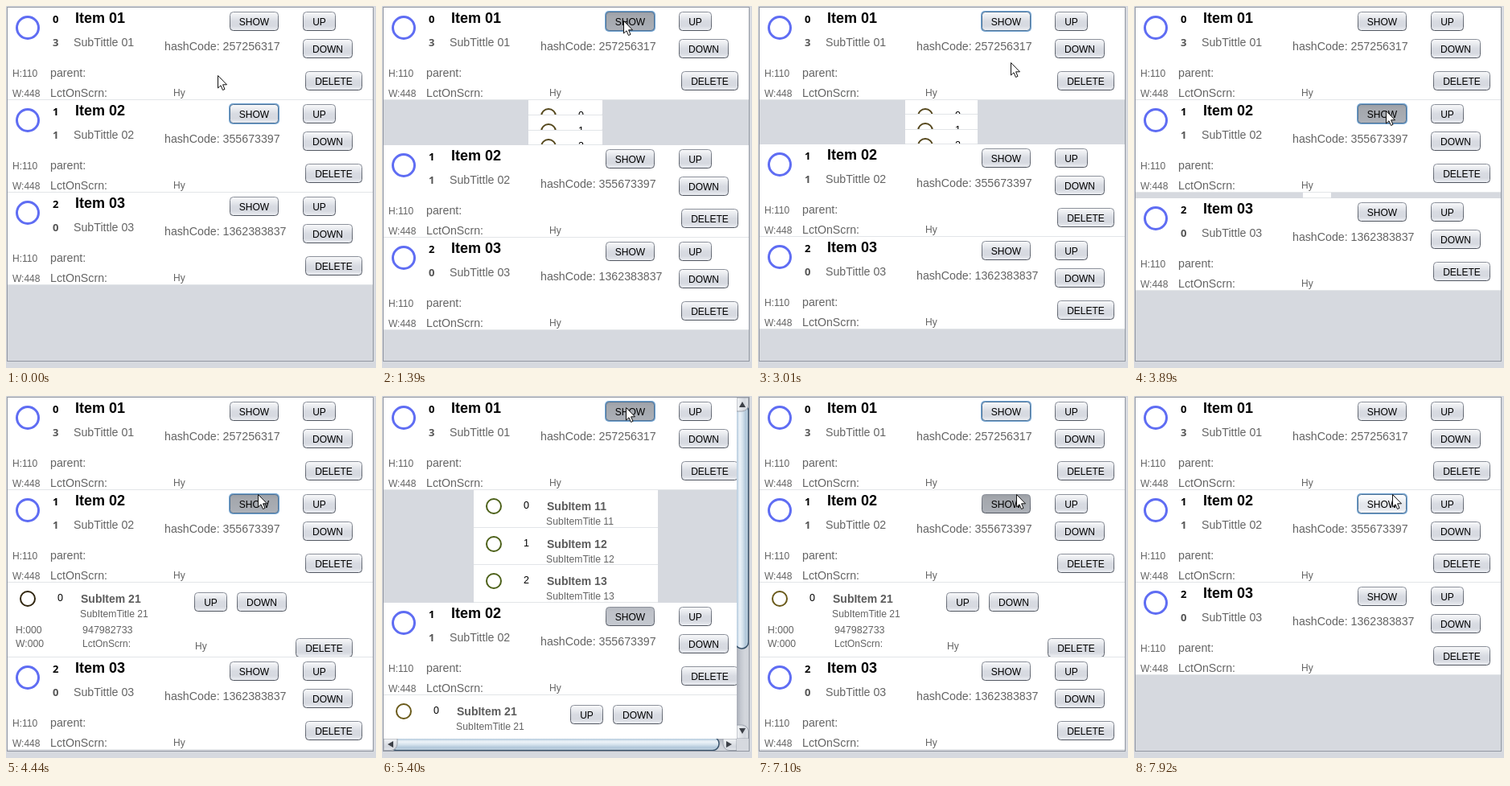
Write an HTML page with a canvas that moves like this. It is 460 px wide and 450 px high and loops after 8.32 s.

```html
<!DOCTYPE html>
<html lang="en">
<head>
<meta charset="utf-8">
<title>Expandable list</title>
<style>
  html, body { margin: 0; width: 100%; height: 100%; overflow: hidden; background: #d6d9df; }
  canvas { display: block; width: 460px; height: 450px; }
</style>
</head>
<body>
<canvas id="stage" width="460" height="450"></canvas>
<script>
const ctx = document.getElementById('stage').getContext('2d');
const LOOP = 8320, ITEM_H = 115, SUB_H = 93, EXPAND_MS = 400;
const SANS = '"Liberation Sans", Arial, sans-serif';
const GREY = '#646464';

const items = [
  { hash: 257256317, subs: [172581121, 1586601928, 259615392] },
  { hash: 355673397, subs: [947982733] },
  { hash: 1362383837, subs: [] }
];
// [open start, close start] for each item
const toggles = [[[1310, 2690], [5200, 6410]], [[3860, 7480]], []];
// [time, item]
const clicks = [[1260, 0], [2660, 0], [3760, 1], [5160, 0], [6340, 0], [7370, 1]];
// [time, x, y]
const pointer = [
  [0, 263, 86], [540, 263, 86], [1000, 300, 18], [1880, 300, 18], [2130, 300, 50],
  [2370, 300, 50], [2460, 306, 22], [2780, 306, 22], [3010, 314, 70], [3210, 313, 149],
  [3380, 313, 149], [3560, 313, 130], [4370, 313, 130], [4440, 313, 122], [4630, 305, 55],
  [4750, 305, 55], [5050, 303, 18], [5300, 303, 18], [5610, 304, 5], [5679, 304, 5],
  [5680, 299, 27], [6079, 299, 27], [6080, 300, 23], [6780, 300, 23], [7100, 321, 122],
  [LOOP, 321, 122]
];

const clamp = v => Math.max(0, Math.min(1, v));
const mix = (a, b, k) => a + (b - a) * k;

function pointerAt(t) {
  const i = pointer.findIndex(k => k[0] > t);
  const [t0, x0, y0] = pointer[i - 1], [t1, x1, y1] = pointer[i];
  const k = (t - t0) / (t1 - t0);
  return [Math.round(mix(x0, x1, k)), Math.round(mix(y0, y1, k))];
}

function openness(i, t) {
  return toggles[i].reduce((sum, [open, close]) =>
    sum + clamp((t - open) / EXPAND_MS) - clamp((t - close) / EXPAND_MS), 0);
}

function isSelected(i, t) {
  return clicks.filter(([at, item]) => item === i && t >= at + 70).length % 2 === 1;
}

function text(str, x, y, size, color = GREY, weight = '', family = SANS) {
  ctx.font = `${weight} ${size}px ${family}`;
  ctx.fillStyle = color;
  ctx.fillText(str, x, y);
}

function rect(x, y, w, h, color) {
  ctx.fillStyle = color;
  ctx.fillRect(x, y, w, h);
}

function ring(x, y, r, width, color) {
  ctx.beginPath();
  ctx.arc(x, y, r, 0, 7);
  ctx.lineWidth = width;
  ctx.strokeStyle = color;
  ctx.stroke();
}

function gradient(x0, y0, x1, y1, colors) {
  const g = ctx.createLinearGradient(x0, y0, x1, y1);
  colors.forEach((c, i) => g.addColorStop(i / (colors.length - 1), c));
  return g;
}

function rounded(x, y, w, h, r) {
  ctx.beginPath();
  ctx.roundRect(x, y, w, h, r);
}

function clipped(x, y, w, h, draw) {
  ctx.save();
  ctx.beginPath();
  ctx.rect(x, y, w, h);
  ctx.clip();
  draw();
  ctx.restore();
}

const faces = {
  normal: ['#fbfbfc', '#e9ebef', '#d8dbe2', '#d6d9e0', '#f0f2f6'],
  hover: ['#ffffff', '#f3f5f8', '#e4e7ec', '#e4e7ec', '#fbfcfd'],
  selected: ['#b4b8bf', '#bfc2c9', '#c0c3ca', '#c2c6cd', '#c6c9d0'],
  selectedHover: ['#9a9ea5', '#a5a8ae', '#a6aab0', '#a9adb4', '#aeb2b9'],
  pressed: ['#84888f', '#8f9298', '#909399', '#93979e', '#999da4']
};

function button(label, x, y, w, face = 'normal', focused = false) {
  if (focused) {
    rounded(x - 1, y - 1, w + 2, 26, 5);
    ctx.fillStyle = '#73a4d1';
    ctx.fill();
  }
  rounded(x + .5, y + .5, w - 1, 23, 4);
  ctx.fillStyle = gradient(0, y, 0, y + 24, faces[face]);
  ctx.fill();
  ctx.lineWidth = 1;
  ctx.strokeStyle = focused ? '#4f7397' : gradient(0, y, 0, y + 24, ['#8d929c', '#6c717b', '#50555f']);
  ctx.stroke();
  ctx.textAlign = 'center';
  text(label, x + w / 2, y + 17, 12, '#000');
  ctx.textAlign = 'left';
}

function showFace(i, y, t, [px, py]) {
  const hover = px >= 278 && px < 339 && py >= y && py < y + 24;
  if (clicks.some(([at, item]) => item === i && t >= at && t < at + 70)) return 'pressed';
  if (isSelected(i, t)) return hover ? 'selectedHover' : 'selected';
  return hover ? 'hover' : 'normal';
}

function drawItem(i, y, t, tip) {
  const { hash, subs } = items[i];
  const name = '0' + (i + 1);
  rect(2, y, 454, ITEM_H, '#fff');
  rect(2, y + ITEM_H - 1, 454, 1, '#e2e5e8');
  ring(27, y + 25, 13.5, 3, '#5f6df3');
  text(i, 58, y + 19, 13, '#000', 'bold', '"Open Sans", sans-serif');
  text(subs.length, 58, y + 48, 13, '#555', 'bold', '"Open Sans", sans-serif');
  text('Item ' + name, 86, y + 19, 18, '#000', 'bold');
  text('SubTittle ' + name, 84, y + 48, 14.2);
  text('hashCode: ' + hash, 197, y + 53, 14.2);
  text('H:110', 8, y + 86, 12);
  text('parent:', 55, y + 86, 14.2);
  text('W:448', 8, y + 111, 12);
  text('LctOnScrn:', 55, y + 111, 14.2);
  text('Hy', 208, y + 110, 12);
  const last = clicks.filter(([at]) => at <= t).pop() || [0, 1];
  button('SHOW', 278, y + 5, 61, showFace(i, y + 5, t, tip), last[1] === i);
  button('UP', 369, y + 5, 41);
  button('DOWN', 369, y + 39, 62);
  button('DELETE', 372, y + 79, 71);
}

function subRingColor(i, p, t) {
  if (i === 0) return `rgb(${mix(92, 62, p)}, ${mix(56, 138, p)}, ${mix(32, 20, p)})`;
  return t < 4780 ? '#30260f' : '#6a5a1a';
}

// Sub panels keep their content unscaled; only their visible area grows.
function drawSub(i, j, y, h, p, t) {
  const name = `${i + 1}${j + 1}`, x = Math.round(2 + 226 * (1 - p)), w = Math.round(455 * p);
  clipped(x, y, w, h, () => {
    rect(x, y, w, h, '#fff');
    ctx.save();
    ctx.translate(x - 2, y);
    ring(27, 20, 9, 2, subRingColor(i, p, t));
    text(j, 64, 23, 12.5, '#000');
    text('SubItem ' + name, 93, 25, 14, '#5c5c5c', 'bold');
    text('SubItemTitle ' + name, 92, 43, 12.2);
    text('H:000', 12, 63, 12.2);
    text(items[i].subs[j], 95, 63, 12.5);
    text('W:000', 12, 80, 12.2);
    text('LctOnScrn:', 95, 80, 12);
    text('Hy', 235, 83, 12);
    button('UP', 234, 12, 41);
    button('DOWN', 287, 12, 62);
    button('DELETE', 360, 69, 71);
    ctx.restore();
    rect(x, y + h - 1, w, 1, '#e2e5e8');
  });
}

function drawList(t, tip, open) {
  let y = 2;
  items.forEach(({ subs }, i) => {
    drawItem(i, y, t, tip);
    y += ITEM_H;
    subs.forEach((_, j) => {
      const top = y + Math.round(SUB_H * open[i] * j);
      const bottom = y + Math.round(SUB_H * open[i] * (j + 1));
      if (bottom > top) drawSub(i, j, top, bottom - top, open[i], t);
    });
    y += Math.round(SUB_H * open[i] * subs.length);
  });
}

function arrow(x, y, angle) {
  ctx.save();
  ctx.translate(x, y);
  ctx.rotate(angle);
  ctx.beginPath();
  ctx.moveTo(-4, 0);
  ctx.lineTo(3, -4);
  ctx.lineTo(3, 4);
  ctx.fillStyle = '#3c4047';
  ctx.fill();
  ctx.restore();
}

// Horizontal bar at the origin, 15 px thick
function scrollbar(length, thumb) {
  rect(0, 0, length, 15, gradient(0, 0, 0, 15, ['#a9aeb8', '#c4c8d0', '#d3d6dc', '#d0d4da']));
  rounded(8, -2, thumb + 18, 16.5, 8);
  ctx.fillStyle = gradient(0, 0, 0, 15, ['#b4cadd', '#eef4f9', '#d3e1ec', '#aec5d8', '#dce9f2']);
  ctx.fill();
  ctx.lineWidth = 1.5;
  ctx.strokeStyle = '#39536c';
  ctx.stroke();
  const cap = gradient(0, 0, 0, 15, ['#f2f4f6', '#e3e6ea', '#d3d7de', '#e6e9ed']);
  for (const [x, r] of [[0, [0, 0, 8, 0]], [length - 17, [0, 0, 0, 8]]]) {
    rounded(x, 0, 17, 14.5, r);
    ctx.fillStyle = cap;
    ctx.fill();
    ctx.lineWidth = 1;
    ctx.strokeStyle = '#9aa0aa';
    ctx.stroke();
  }
  arrow(9, 7, 0);
  arrow(length - 10, 7, Math.PI);
}

function drawScrollbars(contentHeight) {
  rect(441, 2, 15, 439, '#d6d9df');
  clipped(2, 426, 439, 15, () => {
    ctx.translate(2, 426);
    scrollbar(439, 391);
  });
  clipped(441, 2, 15, 424, () => {
    ctx.translate(441, 2);
    ctx.transform(0, 1, 1, 0, 0, 0);
    scrollbar(424, 390 * 424 / contentHeight);
  });
}

const cursorShape = new Path2D('M.5 .5V16L4 12.8L6.5 18.5L9 17.4L6.6 11.8H11.5Z');

function drawCursor([x, y], t) {
  if (clicks.some(([at]) => t >= at && t < at + 70)) {
    ctx.beginPath();
    ctx.arc(x - 1, y - 1, 11.5, 0, 7);
    ctx.fillStyle = 'rgba(235, 215, 30, .72)';
    ctx.fill();
  }
  ctx.save();
  ctx.translate(x, y);
  ctx.fillStyle = '#fff';
  ctx.fill(cursorShape);
  ctx.lineWidth = 1;
  ctx.strokeStyle = '#111';
  ctx.stroke(cursorShape);
  ctx.restore();
}

function frame(now) {
  const t = now % LOOP;
  const tip = pointerAt(t);
  const open = items.map((_, i) => openness(i, t));
  const height = items.reduce((sum, { subs }, i) => sum + ITEM_H + SUB_H * subs.length * open[i], 0);
  const scrolls = height > 439;

  rect(0, 0, 460, 450, '#d6d9df');
  clipped(2, 2, scrolls ? 439 : 454, scrolls ? 424 : 439, () => drawList(t, tip, open));
  if (scrolls) drawScrollbars(height);
  ctx.lineWidth = 1;
  ctx.strokeStyle = '#9297a1';
  ctx.strokeRect(1.5, 1.5, 455, 440);
  drawCursor(tip, t);
  requestAnimationFrame(frame);
}
requestAnimationFrame(frame);
</script>
</body>
</html>
```
